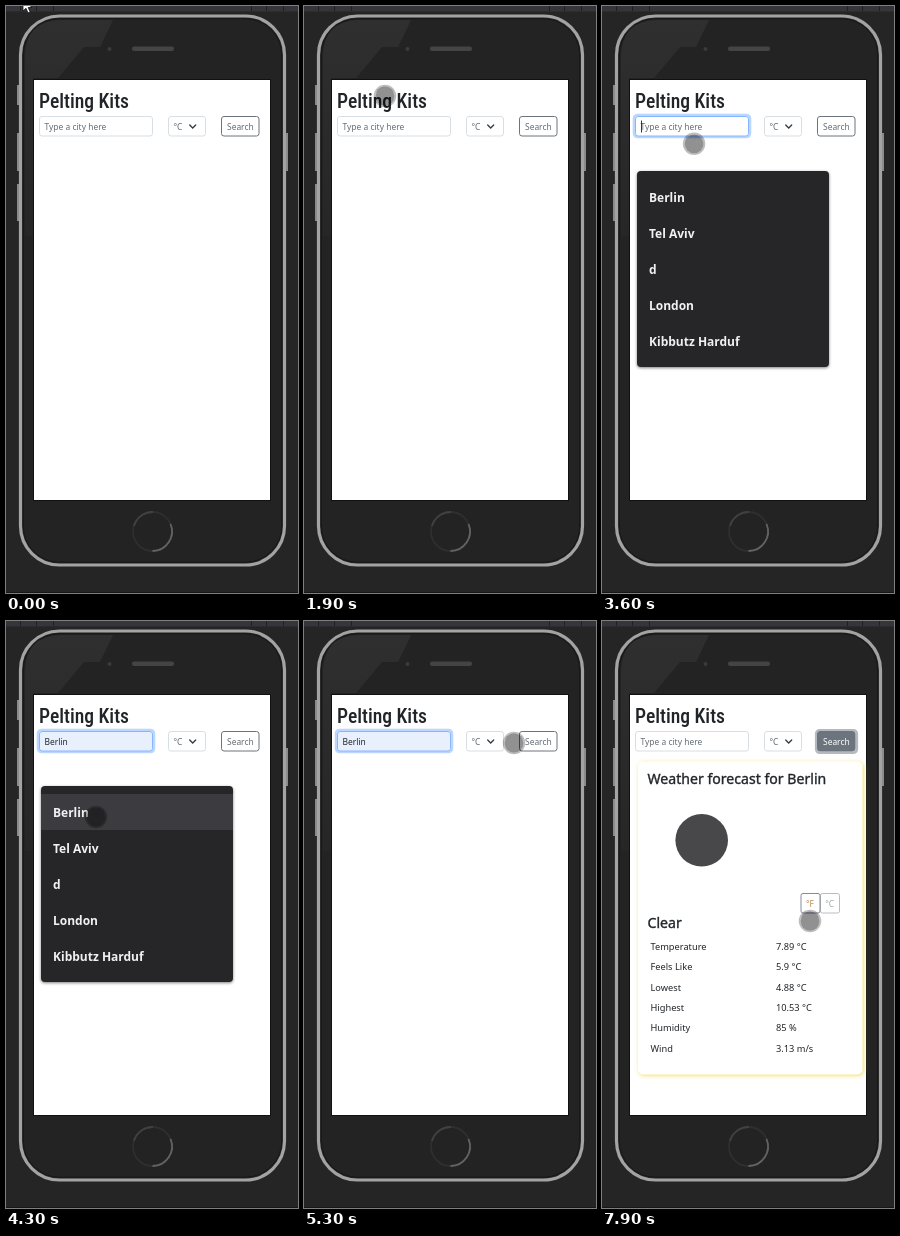
An HTML page for the animation above (8 s loop, 292x587 px).

```html
<!DOCTYPE html>
<html lang="en">
<head>
<meta charset="utf-8">
<title>Weather app demo</title>
<style>
  html, body { margin: 0; width: 100%; height: 100%; overflow: hidden; background: #252526; }
  svg { display: block; width: 100%; height: 100%; }
  text { font-family: "Noto Sans", "Open Sans", sans-serif; white-space: pre; }
  .title { font: 500 19.6px "Roboto Condensed", Roboto, sans-serif; font-stretch: 75%; fill: #212529; }
  .small { font-size: 8.45px; fill: #626c75; }
  .head { font-size: 14.1px; fill: #212529; stroke: #212529; stroke-width: .35px; }
  .cell { font-size: 9.25px; fill: #212529; }
  .item { font-size: 12px; font-weight: 600; fill: #f1f1f2; }
  .field { fill: #fff; stroke: #d8dfe4; }
  .ring { fill: none; stroke-width: 2.6px; }
  #list { filter: drop-shadow(0 1px 1.5px rgba(0, 0, 0, .5)); }
  #card { filter: drop-shadow(1px 1.5px 2px #f2dd66); }
</style>
</head>
<body>
<svg viewBox="0 0 292 587" preserveAspectRatio="none">
  <defs>
    <linearGradient id="sheen" x2="0" y2="1">
      <stop offset="0" stop-color="#2f2f2f"/>
      <stop offset="1" stop-color="#262626"/>
    </linearGradient>
  </defs>

  <rect width="292" height="5.5" fill="#35353a"/>
  <path d="M14.5 0V5M30.5 0V5M47.5 0V5M245.5 0V5M260.5 0V5M277.5 0V5" stroke="#202023"/>
  <path d="M0 586.5H292" stroke="#161616"/>

  <g id="phone">
    <path d="M12.5 79V99M12.5 127V165M12.5 178V215M280.5 127V165" stroke="#8a8a8a" stroke-width="3"/>
    <rect x="14.5" y="10" width="264" height="549" rx="39" fill="#232324" stroke="#a3a3a3" stroke-width="3.2"/>
    <rect x="17.3" y="12.8" width="258.4" height="543.4" rx="36" fill="none" stroke="#171717"/>
    <path d="M19 230V50Q20 15 54 14H107L94 41H78L52 72H27V230Z" fill="url(#sheen)"/>
    <rect x="126" y="40.5" width="42" height="4.5" rx="2" fill="#444"/>
    <circle cx="103.5" cy="43" r="2" fill="#3b3b3b"/>
    <g fill="none" stroke-width="1.8">
      <circle cx="146.5" cy="525.5" r="19.5" stroke="#2f2f2f"/>
      <path d="M164.5 518A19.5 19.5 0 0 1 146.5 545" stroke="#636363"/>
      <path d="M128 520A19.5 19.5 0 0 1 147 506" stroke="#414141"/>
    </g>
    <rect x="28" y="74" width="236" height="420" fill="#fff" stroke="#111" stroke-width="2" paint-order="stroke"/>
  </g>

  <text class="title" x="33" y="101.8">Pelting Kits</text>

  <g id="form">
    <rect id="inputRing" class="ring" x="32" y="109" width="116" height="22" rx="3.5" stroke="#0d6efd" stroke-opacity=".28"/>
    <rect id="input" class="field" x="33.5" y="110.5" width="113" height="19.5" rx="2.5"/>
    <text id="value" class="small" x="38.5" y="123.6"></text>
    <path id="caret" stroke="#222" stroke-width=".9"/>
    <rect class="field" x="162.5" y="110.5" width="37" height="19.5" rx="2.5"/>
    <text class="small" x="167.5" y="123.6">°C</text>
    <path d="M183.7 119L186.7 122L189.7 119" fill="none" stroke="#343a40" stroke-width="1.3" stroke-linecap="round"/>
    <rect id="buttonRing" class="ring" x="214.2" y="109.2" width="40.6" height="22.6" rx="3.5" stroke="#6c757d" stroke-opacity=".5"/>
    <rect id="button" x="215.5" y="110.5" width="37.5" height="19.5" rx="2.5" stroke="#6c757d"/>
    <text id="label" class="small" x="221" y="123.6">Search</text>
  </g>

  <g id="list">
    <rect x="35" y="165" width="192" height="196" rx="4" fill="#262629"/>
    <rect id="hover" x="35" y="173" width="192" height="36" fill="#3c3c40"/>
  </g>

  <g id="results">
    <rect id="card" x="36" y="140.5" width="224.5" height="313" rx="5" fill="#fff"/>
    <text class="head" x="45.5" y="163">Weather forecast for Berlin</text>
    <circle cx="99.7" cy="219.3" r="26.3" fill="#48484a"/>
    <rect x="218.5" y="272.5" width="19" height="19.5" rx="2" fill="#fff" stroke="#b9bcc0"/>
    <rect x="199" y="272.5" width="19" height="19.5" rx="2" fill="#fff" stroke="#858b9a"/>
    <text class="small" x="204" y="285.5" style="fill:#b98a52">°F</text>
    <text class="small" x="223.2" y="285.5" style="fill:#a5a8ac">°C</text>
    <text class="head" x="45.5" y="307">Clear</text>
  </g>

  <path id="arrow" d="M0 0V12L3 9.3L5 14L7.2 13L5.2 8.5H9Z" fill="#fff" stroke="#111" stroke-width=".8"/>
  <g id="touch">
    <circle r="9.4" fill="#000" fill-opacity=".43"/>
    <circle r="10.3" fill="none" stroke="#000" stroke-opacity=".26" stroke-width="1.9"/>
  </g>
</svg>
<script>
const LOOP = 8000, STEP = 100, BLINK = 500;
const $ = id => document.getElementById(id);
const show = (id, on) => { $(id).style.display = on ? "" : "none"; };
const set = (id, attrs) => {
  for (const key in attrs) $(id).setAttribute(key, attrs[key]);
};
const addText = (parent, cls, x, y, content) => {
  const node = document.createElementNS("http://www.w3.org/2000/svg", "text");
  node.setAttribute("class", cls);
  node.setAttribute("x", x);
  node.setAttribute("y", y);
  node.textContent = content;
  $(parent).append(node);
};

["Berlin", "Tel Aviv", "d", "London", "Kibbutz Harduf"]
  .forEach((name, i) => addText("list", "item", 47, 195.7 + 36 * i, name));

Object.entries({
  "Temperature": "7.89 °C", "Feels Like": "5.9 °C", "Lowest": "4.88 °C",
  "Highest": "10.53 °C", "Humidity": "85 %", "Wind": "3.13 m/s"
}).forEach(([name, value], i) => {
  const y = 328.8 + 20.4 * i;
  addText("results", "cell", 48.5, y, name);
  addText("results", "cell", 174, y, value);
});

// Each gesture is a curve from the last resting place, pulled towards bend.
const home = [17, -7];
const gestures = [
  { from: 600, to: 1500, bend: [290, 258], end: [155, 168] },
  { from: 1500, to: 1900, bend: [0, 95], end: [81, 90] },
  { from: 1900, to: 2400, bend: [335, 40], end: [197, 198] },
  { from: 2400, to: 3100, bend: [125, 200], end: [93, 121] },
  { from: 3500, to: 4100, bend: [90, 174], end: [90, 196] },
  { from: 4400, to: 5300, bend: [67, 145], end: [210, 122] },
  { from: 5300, to: 5600, bend: [222, 122], end: [229, 121] },
  { from: 7200, to: 7900, bend: [290, 370], end: [208, 300] }
];

function pointerAt(t) {
  let place = home;
  for (const { from, to, bend, end } of gestures) {
    if (t < from) break;
    const k = Math.min(1, (t - from) / (to - from));
    place = place.map((start, i) =>
      (1 - k) ** 2 * start + 2 * k * (1 - k) * bend[i] + k * k * end[i]);
  }
  return place;
}

function draw(t) {
  const within = (from, to) => t >= from && t < to;
  const focused = within(3500, 6200);
  const filled = within(4000, 6200);
  const pressed = t >= 5900;
  const done = t >= 6200;

  show("inputRing", focused);
  set("input", { style: filled ? "fill:#e8f0fe;stroke:#86b7fe" : focused ? "stroke:#86b7fe" : "" });
  $("value").textContent = filled ? "Berlin" : "Type a city here";
  $("value").style.fill = filled ? "#212529" : "";
  show("caret", focused && Math.floor(t / BLINK) % 2);
  set("caret", { d: filled ? "M60.8 114.5V126.5" : "M39.5 114.5V126.5" });

  show("list", within(3600, 4500));
  show("hover", filled);
  show("buttonRing", done);
  set("button", { fill: pressed ? "#6c757d" : "#fff" });
  $("label").style.fill = pressed ? "#fff" : "";
  show("results", done);

  const move = { transform: `translate(${pointerAt(t)})` };
  set("arrow", move);
  set("touch", move);
  show("arrow", t < 700);
  show("touch", t >= 700);
}

function tick(now) {
  draw(Math.floor((now % LOOP) / STEP) * STEP);
  requestAnimationFrame(tick);
}
draw(0);
requestAnimationFrame(tick);
</script>
</body>
</html>
```
